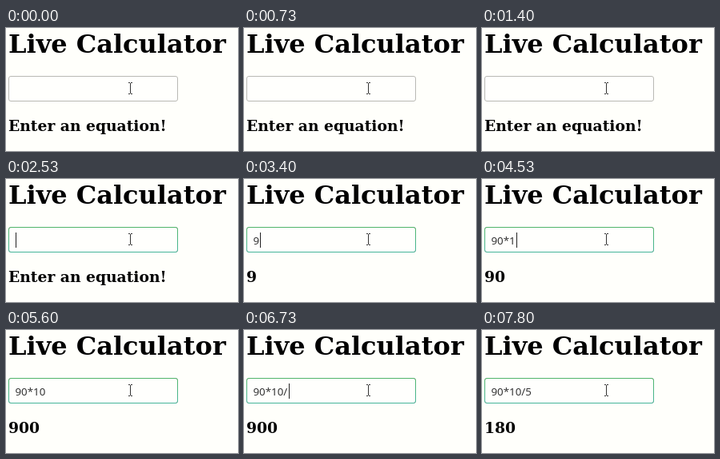
An HTML page that plays this animation: 290x154 px, repeating every 8 s.

```html
<!DOCTYPE html>
<html lang="en">
<head>
<meta charset="utf-8">
<title>Live Calculator</title>
<style>
html, body { margin: 0; width: 100%; height: 100%; overflow: hidden; background: #fffffb; }
svg { display: block; width: 290px; height: 154px; }
.head { font-family: "DejaVu Serif", serif; font-weight: bold; fill: #000; }
#typed { font: 13.333px "Noto Sans", "Open Sans", sans-serif; fill: #333; }
</style>
</head>
<body>
<svg viewBox="0 0 290 154">
  <defs>
    <linearGradient id="ring" x1="0" y1="0" x2="0" y2="1">
      <stop offset="0" stop-color="#50b56a"/>
      <stop offset="1" stop-color="#45b59a"/>
    </linearGradient>
  </defs>
  <text class="head" x="3" y="31" font-size="32">Live Calculator</text>
  <rect x="3.5" y="60.5" width="211" height="31" rx="2.5" fill="#fffffd" stroke="#b9b9b4"/>
  <rect id="focus" x="3.5" y="60.5" width="211" height="31" rx="2.5" fill="none" stroke="url(#ring)"/>
  <text id="typed" x="11.5" y="82"></text>
  <rect id="caret" y="67" width="1" height="19" fill="#222"/>
  <text id="result" class="head" x="3" y="129" font-size="18.72"></text>
  <path d="M153 68.5h2m1 0h2M155.5 69v13M153 82.5h2m1 0h2" fill="none" stroke="#333"/>
</svg>
<script>
const LOOP = 8000;
const $ = id => document.getElementById(id);

// [start ms, value]
const typing = [[0, ""], [3330, "9"], [4130, "90"], [4330, "90*"], [4530, "90*1"],
  [4730, "90*10"], [6670, "90*10/"], [6930, "90*10/5"]];
const results = [[0, "Enter an equation!"], [3330, "9"], [4200, "90"], [4800, "900"], [7000, "180"]];
const blinks = [[0, 0], [1730, 1], [2930, 0], [3330, 1], [5270, 0], [6270, 1], [7670, 0]];
const caretX = [12, 20, 27, 35, 43, 50, 56, 64];

const at = (steps, t) => steps.filter(s => s[0] <= t).pop()[1];
const fade = (t, from, to) => Math.min(1, Math.max(0, (t - from) / (to - from)));

function draw(t) {
  const text = at(typing, t);
  $("typed").textContent = text;
  $("result").textContent = at(results, t);
  $("focus").style.opacity = fade(t, 1665, 1930);
  $("caret").setAttribute("x", caretX[text.length]);
  $("caret").style.opacity = at(blinks, t);
}

const start = performance.now();
function tick() {
  draw((performance.now() - start) % LOOP);
  requestAnimationFrame(tick);
}
tick();
</script>
</body>
</html>
```
